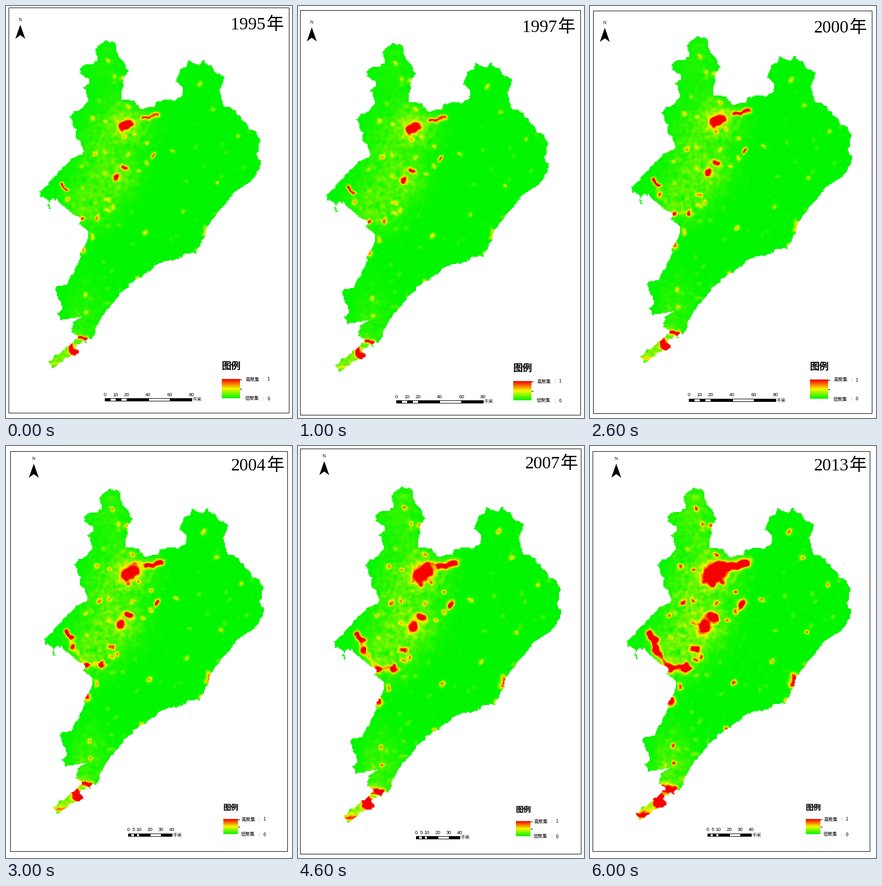
A matplotlib script that plays this animation: 550 px wide and 792 px high, repeating every 7000 ms.

```python
import numpy as np
import matplotlib.pyplot as plt
from matplotlib.animation import FuncAnimation
from matplotlib.colors import LinearSegmentedColormap
from matplotlib.patches import Polygon, Rectangle
from matplotlib.path import Path

W, H, DPI = 550, 792, 100
PX = 72 / DPI
CJK = "Noto Sans CJK JP"
SERIF = "Liberation Serif"
SANS = "Liberation Sans"
HEAT = LinearSegmentedColormap.from_list(
    "heat", [(0, 0.965, 0), (0.965, 0.965, 0), (0.965, 0, 0)])
HEAT.set_bad((1, 1, 1, 0))

# Region outline, clockwise from the northern tip; noise roughens it later
EAST = [
    (176, 76), (193, 66), (209, 69), (217, 97), (237, 124), (227, 135),
    (222, 179), (248, 184), (260, 198), (285, 191), (288, 184), (307, 178),
    (325, 181), (338, 171), (341, 160), (328, 146), (334, 120), (345, 118),
    (351, 106), (372, 113), (379, 103), (384, 113), (395, 114), (402, 129),
    (421, 136), (411, 164), (420, 195), (432, 194), (460, 223), (468, 236),
    (478, 240), (489, 259), (481, 288), (491, 296), (486, 317), (472, 336),
    (436, 362), (385, 427), (383, 441), (365, 475), (344, 477), (333, 486),
    (303, 491), (283, 499), (280, 507), (240, 533)]
WEST = [
    (222, 549), (205, 572), (184, 597), (175, 617), (166, 640), (152, 643),
    (158, 650), (147, 645), (131, 655), (141, 662), (140, 669), (118, 676),
    (90, 697), (81, 684), (91, 679), (93, 672), (123, 653), (139, 638),
    (126, 628), (132, 607), (147, 597), (123, 601), (106, 602), (99, 593),
    (110, 580), (95, 550), (97, 541), (117, 535), (133, 508), (147, 470),
    (160, 442), (157, 432), (141, 418), (144, 410), (109, 383), (95, 368),
    (97, 377), (90, 369), (83, 376), (85, 388), (81, 388), (81, 372),
    (67, 367), (65, 358), (94, 327), (129, 293), (147, 284), (143, 260),
    (135, 254), (134, 240), (121, 211), (149, 193), (160, 181), (150, 158),
    (160, 150), (160, 141), (142, 128), (149, 112), (168, 111), (176, 105),
    (172, 84)]

# Urban strips: x0, y0, x1, y1, first width, first strength
CITIES = [
    (224, 233, 238, 226, 7, 1.6), (264, 216, 293, 208, 4, 0.85),
    (238, 213, 264, 213, 4, 0.0), (209, 334, 211, 326, 5.5, 1.1),
    (225, 308, 230, 313, 4, 0.9), (282, 291, 285, 287, 4, 0.85),
    (108, 343, 116, 352, 3.6, 0.95), (117, 354, 121, 374, 4, 0.0),
    (121, 374, 143, 408, 3, -0.1), (146, 409, 149, 408, 3.8, 0.8),
    (150, 408, 182, 408, 3, 0.1), (177, 406, 177, 409, 3.8, 0.65),
    (148, 465, 149, 472, 3.8, 0.7), (138, 635, 151, 640, 4, 1.1),
    (124, 653, 129, 668, 5, 1.4), (130, 665, 139, 664, 4, 1.2),
    (88, 686, 104, 685, 3.5, 0.25), (190, 372, 197, 372, 4, 0.45),
    (384, 426, 381, 438, 4, 0.4)]

TOWNS = [
    (196, 105), (209, 135), (224, 140), (167, 216), (191, 220), (235, 193),
    (229, 249), (246, 245), (269, 265), (320, 279), (172, 284), (189, 279),
    (235, 283), (145, 309), (374, 151), (397, 198), (447, 250), (271, 301),
    (255, 316), (406, 339), (342, 394), (267, 437), (252, 523), (153, 556),
    (156, 588), (167, 443), (195, 393), (206, 387), (119, 371), (369, 470)]

# x, y, x spread, y spread, first and last strength
HAZE = [
    (231, 228, 42, 34, 0.25, 0.3), (190, 290, 55, 75, 0.13, 0.2),
    (160, 380, 45, 45, 0.16, 0.21), (222, 330, 34, 34, 0.13, 0.2),
    (190, 120, 45, 70, 0.05, 0.15), (105, 665, 40, 35, 0.28, 0.42),
    (150, 590, 35, 60, 0.08, 0.18)]

# year, page (left, top, scale), map (scale, x, y), legend x, scale bar x
SHEETS = [
    (1995, (5, 3, 0.9995), (1, 0, 0), 415, 190),
    (1997, (4, 8, 0.9992), (1.003, -10.2, 4.8), 414, 189),
    (2000, (6, 9, 0.9935), (0.996, 15.3, -6.7), 423, 190),
    (2004, (8, 10, 0.9872), (0.992, 9.5, 16.5), 418, 235),
    (2007, (4, 5, 1.0), (1.0245, 3.4, 10.4), 419, 227),
    (2010, (7, 10, 0.989), (1.0135, 7.1, 14.1), 418, 228),
    (2013, (5, 10, 0.9872), (1.0135, 5.1, 13.1), 415, 226)]

# Positions on the page: the later sheets use a smaller legend and scale
WIDE = dict(title=(-112, 42), tip=(22, 33.5), legend_y=714, bar_y=754,
            ramp=(35, 37), head=18.5, gap=45, lift=25, bar=167, unit=2)
SMALL = dict(title=(-108, 37.5), tip=(45.5, 24.5), legend_y=716, bar_y=748,
             ramp=(28, 29), head=15, gap=34, lift=22, bar=84, unit=1)

# Raster grid in map units
X0, X1, Y0, Y1, CELL = 60, 500, 60, 702, 2
gx, gy = np.meshgrid(np.arange(X0, X1, CELL) + CELL / 2,
                     np.arange(Y0, Y1, CELL) + CELL / 2)
rng = np.random.default_rng(7)


def noise(passes):
    a = rng.normal(size=gx.shape)
    for _ in range(passes):
        a = (a + sum(np.roll(a, d, ax) for d in (-1, 1) for ax in (0, 1))) / 5
    return (a - a.mean()) / a.std()


fine, speckle = noise(3), noise(6)
wx, wy = gx + 1.3 * noise(8), gy + 1.3 * noise(8)
edge = np.column_stack([(gx + noise(3)).ravel(), (gy + noise(3)).ravel()])
land = Path(EAST + WEST).contains_points(edge).reshape(gx.shape)
vigour = rng.uniform(-0.1, 0.1, len(TOWNS))
hamlets = rng.uniform((X0, Y0, 0.05), (X1, Y1, 0.3), (130, 3))


def mix(a, b, t):
    return a + (b - a) * t


def spot(x, y, width):
    return np.exp(-((wx - x) ** 2 + (wy - y) ** 2) / width ** 2)


def strip(x0, y0, x1, y1, width):
    dx, dy = x1 - x0, y1 - y0
    k = ((wx - x0) * dx + (wy - y0) * dy) / (dx * dx + dy * dy)
    k = np.clip(k, 0, 1)
    return spot(x0 + k * dx, y0 + k * dy, width)


def density(year):
    t = ((year - 1995) / 18) ** 1.3
    haze = sum(mix(a0, a1, t) * np.exp(-((gx - x) / sx) ** 2 - ((gy - y) / sy) ** 2)
               for x, y, sx, sy, a0, a1 in HAZE)
    v = haze * (0.85 + 0.25 * fine)
    v += np.clip(speckle - 0.8, 0, 2) * (0.05 + 0.08 * t) * (0.15 + 4 * haze)
    v = np.clip(v, 0, None)
    for *ends, width, start in CITIES:
        v += max(0, start + 0.8 * t) * strip(*ends, width * (1 + 0.8 * t))
    for (x, y), extra in zip(TOWNS, vigour):
        v += (0.45 + 0.42 * t + extra) * spot(x, y, 4.3 + 0.5 * t)
    for x, y, strength in hamlets:
        v += strength * (0.6 + 0.4 * t) * spot(x, y, 4)
    return np.ma.array(np.clip(v, 0, 1), mask=~land)


fields = [density(sheet[0]) for sheet in SHEETS]

fig = plt.figure(figsize=(W / DPI, H / DPI), dpi=DPI, facecolor="white")
ax = fig.add_axes([0, 0, 1, 1])


def text(x, y, s, px, font, ha="left", va="center", **kw):
    ax.text(x, y, s, fontsize=px * PX, family=font, ha=ha, va=va, **kw)


def raster(data, x0, x1, y0, y1, how):
    ax.imshow(data, cmap=HEAT, vmin=0, vmax=1, extent=(x0, x1, y1, y0),
              interpolation=how, aspect="auto")


def box(x, y, w, h, fill):
    ax.add_patch(Rectangle((x + 0.5, y + 0.5), w, h, fc=fill, ec="black",
                           lw=PX, snap=False))


def draw_title(x, y, year):
    text(x, y, str(year), 33.5, SERIF, va="baseline")
    text(x + 68, y, "年", 33.5, CJK, va="baseline")


def draw_arrow(x, y):
    text(x, y - 9, "N", 9.5, SERIF, ha="center")
    ax.add_patch(Polygon([(x + 0.5, y), (x + 10, y + 27), (x + 0.5, y + 20),
                          (x - 9, y + 27)], fc="black", ec="none"))


def draw_legend(x, y, style):
    w, h = style["ramp"]
    text(x, y - style["lift"], "图例", style["head"], CJK, weight="bold")
    raster(np.linspace(1, 0, 64)[:, None], x, x + w, y, y + h, "bilinear")
    for ty in (y, y + h / 2):
        ax.plot([x + w, x + w + 3], [ty + 0.5] * 2, color="black", lw=0.8)
    left = x + style["gap"]
    for ty, name, digit in ((y + 1, "高聚集", "1"), (y + h + 1, "低聚集", "0")):
        text(left, ty, name, 9, CJK)
        text(left + 35, ty, ":", 9, CJK, ha="center")
        text(left + 45, ty, digit, 9, CJK, ha="center")


def draw_scale(x, y, style):
    px = style["bar"] / 40
    stops = (0, 2.5, 5, 7.5, 10, 20, 30, 40)
    for i, (a, b) in enumerate(zip(stops, stops[1:])):
        start, end = round(x + a * px), round(x + b * px)
        box(start, y - 3, end - start, 5, "white" if i % 2 else "black")
    for s in (0, 5, 10, 20, 30, 40):
        text(x + s * px, y - 10, str(s * style["unit"]), 9.5, SANS, ha="center")
    text(x + style["bar"] + 2, y, "千米", 9, CJK)


def update(i):
    year, (left, top, size), (k, ox, oy), legend_x, bar_x = SHEETS[i]
    style = WIDE if year <= 2000 else SMALL
    width, height = int(540 * size), round(779 * size)

    def down(y):
        return top + round(y * size)

    ax.clear()
    raster(fields[i], ox + k * X0, ox + k * X1, oy + k * Y0, oy + k * Y1, "nearest")
    box(left, top, width, height, "none")
    tx, ty = style["title"]
    draw_title(left + width + tx, down(ty), year)
    ax_x, ax_y = style["tip"]
    draw_arrow(left + round(ax_x * size), down(ax_y))
    draw_legend(legend_x, down(style["legend_y"]), style)
    draw_scale(bar_x, down(style["bar_y"]), style)
    ax.set(xlim=(0, W), ylim=(H, 0))
    ax.axis("off")
    return []


anim = FuncAnimation(fig, update, frames=len(SHEETS), interval=1000,
                     repeat=True, repeat_delay=0, blit=False)
plt.show()
```
